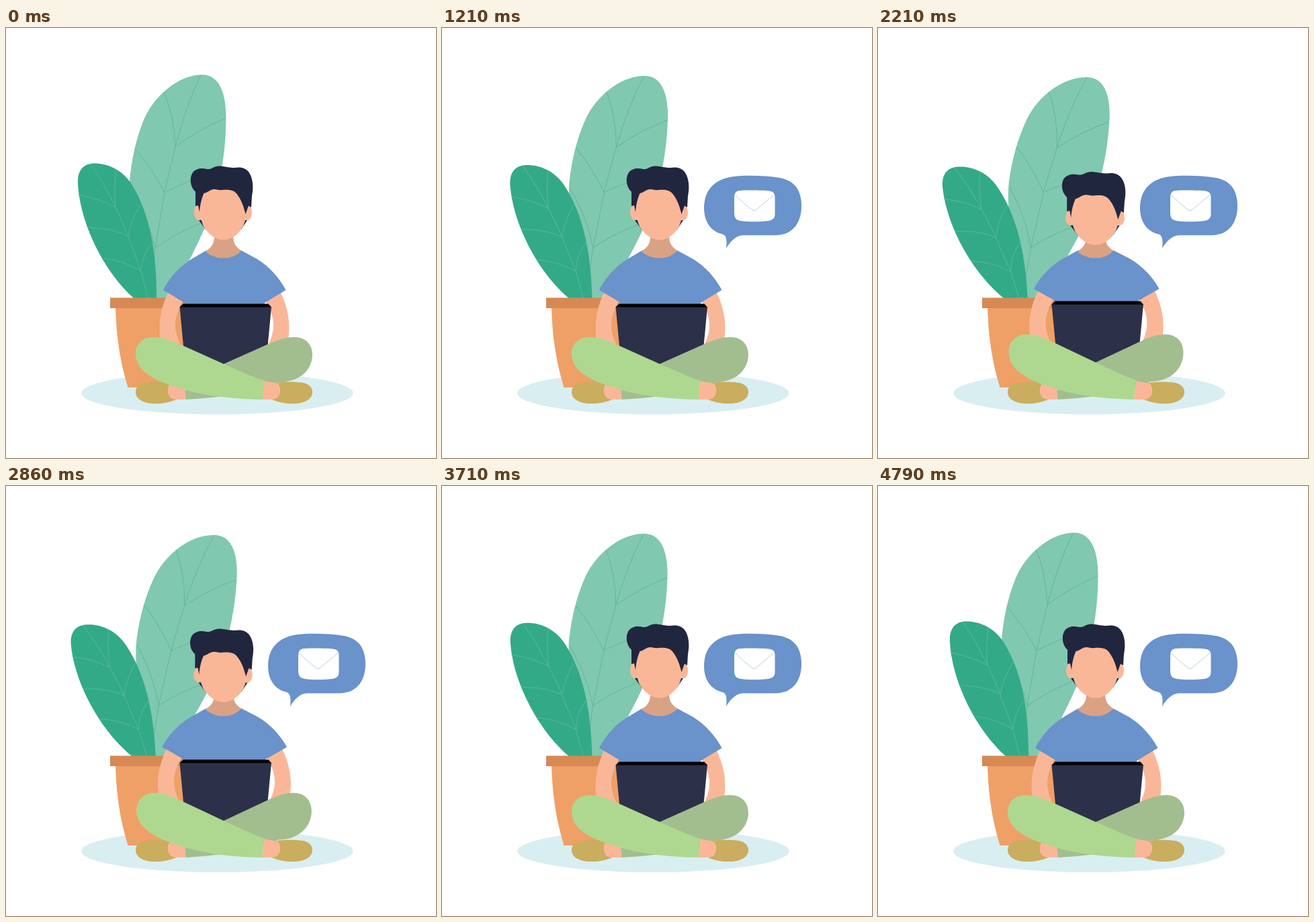
An HTML page that plays this animation: 640 by 640 pixels, repeating every 4.87 s.

```html
<!DOCTYPE html>
<html lang="en">
<head>
<meta charset="utf-8">
<title>Working beside a plant</title>
<style>
  html, body { margin: 0; width: 100%; height: 100%; overflow: hidden; background: #fff; }
  svg { display: block; width: 100%; height: 100%; }
  .vein { fill: none; stroke-width: 1; }
  .skin { fill: #fab798; }
  .hair { fill: #21263f; }
  .shoe { fill: #caad5e; }
</style>
</head>
<body>
<svg viewBox="0 0 640 640">
  <ellipse cx="314.3" cy="543.5" rx="202.3" ry="31.5" fill="#d9eef1"/>

  <g id="tallLeaf">
    <path fill="#80c8b0" d="M216 418C200 360 180 270 184 228C187 195 193 168 203 142C217 103 256 69.5 292 69.5C318 69.5 328 98 327.5 136C327 190 318 240 297 294C280 336 258 372 236 418Z"/>
    <path class="vein" stroke="#62b89a" d="M290 70Q266 120 252 177T236 245T222 328L214 402M235 95Q250 130 252 177Q285 152 327 134M192 180Q215 205 236 245Q265 229 318 212M185 240Q212 282 222 328Q250 306 296 288"/>
  </g>
  <g id="shortLeaf">
    <path fill="#33aa87" d="M224 418V402C224.5 340 216 278 186 231C172 210 150 201.5 132 201.5C114 201.5 106 213 107 232C110 290 145 362 190 402L207 418Z"/>
    <path class="vein" stroke="#57b699" d="M126 202Q146 231 163 267T182 310T201 362L211 402M164 211Q160 240 163 267Q140 254 108 248M122 297Q160 298 182 310Q186 285 201 263M145 343Q175 346 201 362Q203 335 219 318"/>
  </g>
  <path fill="#efa067" d="M163 416C164 455 169 495 181.5 535H258C270 495 275 455 276 416Z"/>
  <path fill="#d68953" d="M155 401.5H285V417H155Z"/>

  <g id="arms" class="skin">
    <path id="arm" d="M241 394C229 420 225 445 232 475L264 480C250 455 246 435 264 406Z"/>
    <use href="#arm" transform="matrix(-1 0 0 1 650 0)"/>
  </g>
  <path id="shirt" fill="#6a92cb" d="M298 331L276 344C258 355 243 372 234 390L266 409V415H385V409L416.5 390C407 372 392 355 374 344L350 331Z"/>
  <path fill="#d9a285" d="M310 308C311 322 304 328 296.5 332.5Q308 342.5 324 342.5Q340 342.5 350.5 331.5C343 326 338 322 338 308Z"/>

  <g id="head">
    <path class="hair" d="M287 286H359L350 300H297Z"/>
    <g class="skin">
      <ellipse cx="286.5" cy="274.5" rx="6.5" ry="11.5"/>
      <ellipse cx="359.5" cy="274.5" rx="6.5" ry="11.5"/>
      <path d="M292 240C286 265 288 283 295 297C304 310 314 315.5 324 315.5C334 315.5 344 309 352 297C359 282 360 265 356 240Z"/>
    </g>
    <path class="hair" d="M288 274C289 262 291 254 294.5 246C300 245 304 240 310 240C315 240 317 242 322 241C333 240 340 241 345 249C351 257 354 267 356.5 277L361 264.5L365 267L366 250C369 235 367 222 361 214C355 207 347 207 340 208C330 208 325 205.5 317 205.5C309 205.5 306 211 299 210C291 208 283 209 278 215C272 224 275 238 282 243.5V265L286 264Z"/>
  </g>

  <g id="laptop">
    <path fill="#2c3049" d="M258.5 415H395L386.5 505H267Z"/>
    <path d="M263.5 410.5H390.5L395 415.5H258.5Z"/>
  </g>

  <path id="backLeg" fill="#a2be8f" d="M265 540L324 500L389 471C405 464 416 460 429 460C446 460 456 471 456 486C456 508 438 527.5 405 527.5C385 540 330 549.5 266.5 553Z"/>
  <g id="foot">
    <path class="shoe" d="M400 528C420 526 430 526.5 438 527.5C450 528.5 456 534 456 542C456 552 445 559 428 559C414 559 406 557 396 553Z"/>
    <path class="skin" d="M384 525C392 527.5 398 527.5 403 528.5C410 532 410 547 403 551C399 553.5 390 553 381 553Z"/>
  </g>
  <use href="#foot" transform="matrix(-1 0 0 1 649 0)"/>
  <path id="frontLeg" fill="#aed88f" d="M220 460C235 460 248 466 264 473L324 500C345 509 365 519 384.5 525L381.5 553C330 552 290 546 262 537C215 524 193 508 193 485C193 470 204 460 220 460Z"/>

  <g id="bubble">
    <path fill="#6a92cb" d="M423 328C429 318 437 309 448 308.5H497C522 308 535 290 535 265C535 240 524 227 503 223C480 219 450 219 434 221C404 225 390 243 390 268C390 288 400 303 418 307C424 309 424 318 423 328Z"/>
    <path fill="#fff" d="M443 242C455 241.3 478 241.5 487 242.5C493 243.5 495.5 246 495.5 252V277C495.5 283 492 286 486 287C473 288.7 455 288.7 444 287C437 285.5 435 282 435 275V254C435 246 437 242.5 443 242Z"/>
    <path fill="none" stroke="#a9c0e2" stroke-width=".8" d="M437 249C446 258 456 267 463 271.5Q465 272.5 467 271L494.5 248"/>
  </g>
</svg>
<script>
const LOOP = 4870;
const POP_TIME = 1210;
const BREATH_PEAK = 2440, BREATH_HALF = 1270;

const clamp = v => Math.min(1, Math.max(0, v));
const wave = u => (1 - Math.cos(Math.PI * u)) / 2;

// Cubic bezier easing (x1, 0, x2, 1), solved by bisection.
function ease(x, x1, x2) {
  let low = 0, high = 1, s = .5;
  for (let i = 0; i < 24; i++) {
    s = (low + high) / 2;
    const r = 1 - s;
    if (3 * r * r * s * x1 + 3 * r * s * s * x2 + s ** 3 < x) low = s;
    else high = s;
  }
  return s * s * (3 - 2 * s);
}

const place = (id, transform) =>
  document.getElementById(id).setAttribute('transform', transform);
const scaleAt = (x, y, sx, sy, dy = 0) =>
  `translate(${x} ${y + dy}) scale(${sx} ${sy}) translate(${-x} ${-y})`;

function draw(now) {
  const t = now % LOOP;
  const sway = wave(2 * t / LOOP);
  const breath = wave(clamp(1 - Math.abs(t - BREATH_PEAK) / BREATH_HALF));
  const pop = t < POP_TIME ? ease(t / POP_TIME, .62, .3) : 1;

  place('tallLeaf', `rotate(${3.5 * sway} 240 418)`);
  place('shortLeaf', `rotate(${-3.3 * sway} 215 425)`);

  const legs = scaleAt(324.5, 553, 1 - .012 * breath, 1 + .047 * breath);
  place('backLeg', legs);
  place('frontLeg', legs);
  place('arms', scaleAt(325, 400, 1 + .036 * breath, 1, -3 * breath));
  place('shirt', scaleAt(325, 332, 1 + .024 * breath, 1 - .035 * breath));
  place('head', scaleAt(321, 260, 1 + .022 * breath, 1 - .01 * breath, 8.8 * breath));
  place('laptop', `translate(0 ${-4.4 * breath})`);
  place('bubble', scaleAt(423, 328, pop, pop));
  requestAnimationFrame(draw);
}
requestAnimationFrame(draw);
</script>
</body>
</html>
```
